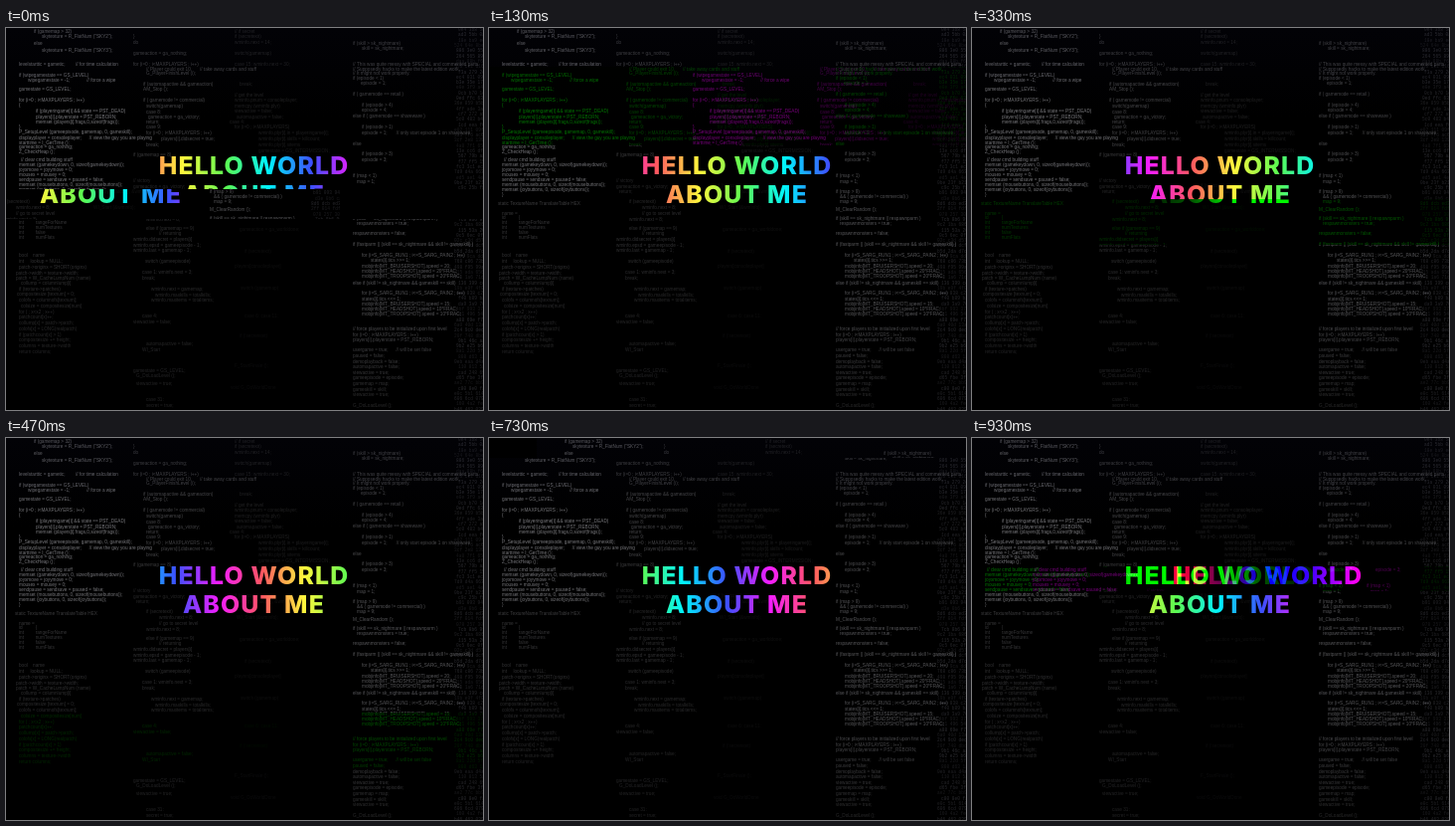
An HTML page with a canvas for the animation above (0.99 s loop, 480 px wide and 384 px high).

```html
<!DOCTYPE html>
<html lang="en">
<head>
<meta charset="utf-8">
<title>Hello world</title>
<style>
html, body { margin: 0; width: 100%; height: 100%; overflow: hidden; background: #000; }
canvas { display: block; width: 480px; height: 384px; }
</style>
</head>
<body>
<canvas id="stage" width="480" height="384"></canvas>
<script>
const W = 480, H = 384, LOOP = 990;
const STEPS = [0, 70, 130, 200, 270, 330, 400, 470, 530, 600, 670, 730, 800, 870, 930];

// Glitch bands by step time: top, bottom, shift, and whether only red and blue move
const GLITCHES = {
  0: [[162, 192, -144]],
  130: [[39, 118, 192, true]],
  330: [[172, 218, 480, true]],
  400: [[332, 379, 480, true]],
  470: [[276, 332, 480, true]],
  730: [[0, 20, 48]],
  800: [[33, 39, -47], [101, 116, 96]],
  870: [[320, 343, -96]],
  930: [[129, 154, 48, true]]
};

// Code listing: x position, brightness stops [y, alpha], then "y indent text" lines
const COLUMNS = [
  [13, [[0, .4], [30, .45], [80, .55], [165, .52], [178, .25], [240, .22], [330, .16]], `
4 15 if (gamemap > 32)
9 23 skytexture = R_FlatNum ("SKY2");
16 15 else
23 23 skytexture = R_FlatNum ("SKY3");
37 0 levelstarttic = gametic;        // for time calculation
48 0 if (wipegamestate == GS_LEVEL)
53 9 wipegamestate = -1;             // force a wipe
62 0 gamestate = GS_LEVEL;
73 0 for (i=0 ; i<MAXPLAYERS ; i++)
78 0 {
84 17 if (playeringame[i] && state == PST_DEAD)
90 17 players[i].playerstate = PST_REBORN;
95 17 memset (players[i].frags,0,sizeof(frags));
100 0 }
105 0 P_SetupLevel (gameepisode, gamemap, 0, gameskill);
111 0 displayplayer = consoleplayer;      // view the guy you are playing
116 0 starttime = I_GetTime ();
120 0 gameaction = ga_nothing;
125 0 Z_CheckHeap ();
133 2 // clear cmd building stuff
138 0 memset (gamekeydown, 0, sizeof(gamekeydown));
143 0 joyxmove = joyymove = 0;
148 0 mousex = mousey = 0;
153 0 sendpause = sendsave = paused = false;
158 0 memset (mousebuttons, 0, sizeof(mousebuttons));
163 0 memset (joybuttons, 0, sizeof(joybuttons));
168 0 }
177 -4 static TextureName TranslateTable HEX
187 0 name =
191 0 id          {
196 0 int         rangeForName
201 0 int         numTextures
206 0 int         false
211 0 int         numFlats
229 0 bool    name
235 0 int     lookup = NULL;
241 0 patch->originx = SHORT(originx)
247 -3 patch->width = texture->width;
252 -3 patch = W_CacheLumpNum (name)
257 2 collump = columnlump[i]
263 0 if (texture->patches)
268 -2 compositesize [texnum] = 0;
274 0 colofs = columnofs[texnum];
280 2 colsize = compositesize[num]
286 0 for ( ; x<x2 ; x++)
291 0 patchcount[x]++;
297 0 collump[x] = patch->patch;
303 0 colofs[x] = LONG(realpatch)
309 0 if (patchcount[x] > 1)
314 0 compositesize += height;
320 0 columns = texture->width
326 0 return columns;`],
  [128, [[0, .25], [60, .32], [120, .3], [150, .16], [220, .22], [270, .18], [384, .15]], `
9 0 }
15 0 do
26 0 gameaction = ga_nothing;
37 0 for (i=0 ; i<MAXPLAYERS ; i++)
42 13 // Player could exit 10.      // take away cards and stuff
46 13 G_PlayerFinishLevel (i);
57 10 if (automapactive && gameaction)
62 10 AM_Stop ();
73 10 if ( gamemode != commercial)
79 13 switch(gamemap)
85 13 case 8:
90 15 gameaction = ga_victory;
95 13 return;
100 13 case 9:
106 13 for (i=0 ; i<MAXPLAYERS ; i++)
112 28 players[i].didsecret = true;
118 13 break;
128 0 if (gamemap == 8)
154 0 // victory
160 0 gameaction = ga_victory;
165 3 return;
175 13 if (secretexit)
181 26 wminfo.next = 8;
187 26 // go to secret level
193 13 wminfo.next = 8;
202 13 else if (gamemap == 9)
207 26 // returning
213 0 wminfo.didsecret = players[i]
219 0 wminfo.epsd = gameepisode - 1;
224 0 wminfo.last = gamemap - 1;
235 12 switch (gameepisode)
246 9 case 1: wminfo.next = 3;
252 9 break;
263 18 wminfo.next = gamemap;
269 22 wminfo.maxkills = totalkills;
274 18 wminfo.maxitems = totalitems;
290 9 case 4:
296 0 viewactive = false;
318 13 automapactive = false;
324 9 WI_Start
345 0 gamestate = GS_LEVEL;
350 3 G_DoLoadLevel ();
358 3 viewactive = true;
374 13 case 31:
380 13 secret = true;`],
  [230, [[0, .15], [100, .14], [150, .07], [384, .05]], `
4 0 // if secret
9 0 if (secretexit)
15 0 wminfo.next = 14;
26 0 switch(gamemap)
37 0 case 15: wminfo.next = 30;
57 5 break;
68 0 // get the level
73 0 wminfo.pnum = consoleplayer;
79 0 memcpy (wminfo.plyr)
84 0 viewactive = false;
90 2 automapactive = false;
95 -5 case 4:
100 0 for (i=0 ; i<MAXPLAYERS)
106 24 wminfo.plyr[i].in = playeringame[i];
112 24 wminfo.plyr[i].skills = killcount;
118 24 wminfo.plyr[i].sitems
124 24 gamestate = GS_INTERMISSION;
159 0 if (statcopy)
165 0 memcpy (statcopy, &wminfo)
181 2 WI_Start (&wminfo);
203 5 gameaction = ga_worlddone;
225 10 if (secretexit)
240 0 players[consoleplayer]
262 6 switch (gamemap)
290 10 case 6: case 11:
310 5 if (!secretexit)
340 0 F_StartFinale ();
362 -4 void G_DoWorldDone`],
  [349, [[0, .28], [40, .3], [110, .32], [150, .36], [215, .4], [290, .38], [320, .28], [384, .18]], `
16 0 if (skill > sk_nightmare)
21 9 skill = sk_nightmare;
37 0 // This was quite messy with SPECIAL and commented parts.
42 0 // Supposedly hacks to make the latest edition work.
46 0 // It might not work properly.
51 0 if (episode < 1)
56 8 episode = 1;
67 0 if ( gamemode == retail )
78 9 if (episode > 4)
83 9 episode = 4;
89 0 else if ( gamemode == shareware )
100 9 if (episode > 1)
106 9 episode = 1;       // only start episode 1 on shareware
117 0 else
127 9 if (episode > 3)
133 9 episode = 3;
149 0 if (map < 1)
155 4 map = 1;
165 0 if (map > 9)
170 4 && ( gamemode != commercial) )
175 4 map = 9;
183 0 M_ClearRandom ();
192 0 if (skill == sk_nightmare || respawnparm )
197 4 respawnmonsters = true;
207 0 respawnmonsters = false;
218 0 if (fastparm || (skill == sk_nightmare && skill != gameskill) )
229 9 for (i=S_SARG_RUN1 ; i<=S_SARG_PAIN2 ; i++)
234 18 states[i].tics >>= 1;
240 9 mobjinfo[MT_BRUISERSHOT].speed = 20;
245 9 mobjinfo[MT_HEADSHOT].speed = 20*FRAC;
250 9 mobjinfo[MT_TROOPSHOT].speed = 20*FRAC;
257 0 else if (skill != sk_nightmare && gameskill == skill)
267 9 for (i=S_SARG_RUN1 ; i<=S_SARG_PAIN2 ; i++)
273 9 states[i].tics <<= 1;
278 9 mobjinfo[MT_BRUISERSHOT].speed = 15;
283 9 mobjinfo[MT_HEADSHOT].speed = 10*FRAC;
288 9 mobjinfo[MT_TROOPSHOT].speed = 10*FRAC;
303 0 // force players to be initialized upon first level
309 0 for (i=0 ; i<MAXPLAYERS ; i++)
314 0 players[i].playerstate = PST_REBORN;
324 0 usergame = true;      // will be set false
330 0 paused = false;
336 0 demoplayback = false;
341 0 automapactive = false;
347 0 viewactive = true;
352 0 gameepisode = episode;
358 0 gamemap = map;
364 0 gameskill = skill;
369 0 viewactive = true;
380 0 G_DoLoadLevel ();`]
];

const RAINBOW = ["#00f4ff", "#3c50ff", "#f41cff", "#ff5560", "#fff83c", "#5cfa50"];
const PERIOD = 260;

function layer() {
  const c = document.createElement("canvas");
  c.width = W;
  c.height = H;
  return c.getContext("2d");
}

const stage = document.getElementById("stage").getContext("2d");
const back = layer(), page = layer(), tint = layer();

function level(stops, y) {
  const i = Math.max(1, stops.findIndex(s => s[0] >= y));
  const [y0, a0] = stops[i - 1], [y1, a1] = stops[i];
  return a0 + (a1 - a0) * Math.min(1, (y - y0) / (y1 - y0));
}

function drawCode() {
  back.fillStyle = "#000";
  back.fillRect(0, 0, W, H);
  const glow = back.createLinearGradient(0, 0, 0, 90);
  glow.addColorStop(0, "#020206");
  glow.addColorStop(1, "#000");
  back.fillStyle = glow;
  back.fillRect(0, 0, W, 90);
  back.textBaseline = "middle";
  back.font = "4.7px 'Liberation Sans', Arial, sans-serif";
  back.fillStyle = "#dcdce4";
  for (const [x, stops, text] of COLUMNS) {
    for (const line of text.trim().split("\n")) {
      const [, y, indent, code] = line.match(/^(\d+) (-?\d+) (.+)$/);
      back.globalAlpha = level(stops, +y);
      back.fillText(code, x + +indent, +y);
    }
  }
  // Number listing at the right edge
  let seed = 7;
  const random = () => (seed = seed * 16807 % 2147483647) / 2147483647;
  back.font = "4.5px 'Liberation Mono', monospace";
  back.fillStyle = "#c4c4d8";
  for (let y = 2; y < H; y += 5.3) {
    let row = "";
    for (let i = 0; i < 11; i++) row += i % 4 == 3 ? " " : Math.floor(random() * 16).toString(16);
    back.globalAlpha = .12 + random() * .1;
    back.fillText(row, 451 + Math.floor(random() * 3) * 2, y);
  }
  back.globalAlpha = 1;
}

function rainbow(phase) {
  const start = 4 + (phase - 1) * PERIOD, n = RAINBOW.length, turns = 3;
  const g = page.createLinearGradient(start, 0, start + PERIOD * turns, 0);
  for (let i = 0; i <= n * turns; i++) g.addColorStop(i / (n * turns), RAINBOW[(n * turns - i) % n]);
  return g;
}

function drawPage(phase) {
  page.drawImage(back.canvas, 0, 0);
  page.fillStyle = rainbow(phase);
  page.font = "800 24.8px Inter, 'Open Sans', sans-serif";
  page.letterSpacing = "1.2px";
  page.textAlign = "center";
  page.fillText("HELLO WORLD", 249.5, 146.5);
  page.fillText("ABOUT ME", 249.5, 175.5);
}

function addChannel(color, y, h, dx) {
  tint.globalCompositeOperation = "copy";
  tint.drawImage(page.canvas, 0, 0);
  tint.globalCompositeOperation = "multiply";
  tint.fillStyle = color;
  tint.fillRect(0, 0, W, H);
  stage.globalCompositeOperation = "lighter";
  stage.drawImage(tint.canvas, 0, y, W, h, dx, y, W, h);
  stage.globalCompositeOperation = "source-over";
}

function glitch([top, bottom, dx, split]) {
  const h = bottom - top;
  stage.fillStyle = "#000";
  stage.fillRect(0, top, W, h);
  if (split) {
    addChannel("#0f0", top, h, 0);
    addChannel("#f0f", top, h, dx);
  } else {
    stage.drawImage(page.canvas, 0, top, W, h, dx, top, W, h);
  }
}

function render() {
  const now = performance.now() % LOOP;
  const step = STEPS.filter(s => s <= now).pop();
  drawPage(step / LOOP);
  stage.drawImage(page.canvas, 0, 0);
  (GLITCHES[step] || []).forEach(glitch);
  requestAnimationFrame(render);
}

// Colours run cyan, blue, magenta, red, yellow, green from left to right
RAINBOW.reverse().unshift(RAINBOW.pop());
drawCode();
render();
</script>
</body>
</html>
```
